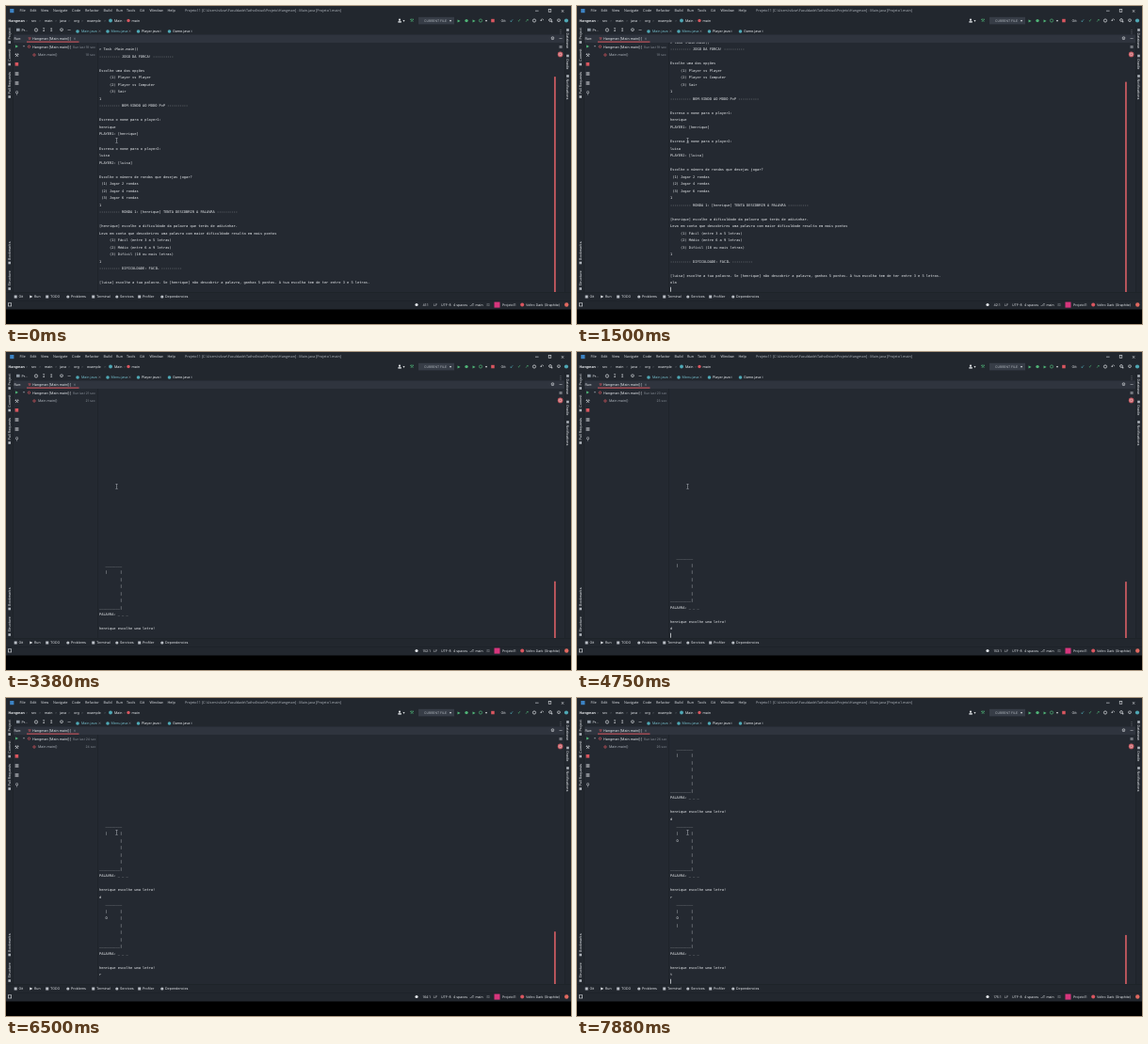
Animation of 600x338 px, one loop 8 s. Source, as an HTML page with a canvas:

```html
<!DOCTYPE html>
<html lang="pt">
<head>
<meta charset="utf-8">
<title>Hangman</title>
<style>
html, body { margin: 0; width: 100%; height: 100%; overflow: hidden; background: #000; }
canvas { display: block; }
</style>
</head>
<body>
<canvas id="stage" width="600" height="338"></canvas>
<script>
const ctx = document.getElementById('stage').getContext('2d');
const LOOP = 8000, LINE = 7.515, CARET_Y = 301.5, CHAR = 2.195;
const UI = 'Inter, sans-serif', MENU = '"Open Sans", sans-serif';
const MONO = '"DejaVu Sans Mono", monospace', SYMBOL = '"DejaVu Sans", sans-serif';
const WHITE = '#e3e6ea', GREY = '#858c95', GREEN = '#4fb477', RED = '#d9565f', TEAL = '#4fa8b5', PINK = '#d6357c';

// Console content
const A = 'henrique', B = 'luisa';
const banner = s => `---------- ${s} ----------`;
const intro = '\n'.repeat(6) + [
  '> Task :Main.main()', banner('JOGO DA FORCA!'), '',
  'Escolhe uma das opções',
  '     (1) Player vs Player', '     (2) Player vs Computer', '     (3) Sair', '1',
  banner('BEM-VINDO AO MODO PvP'), '',
  'Escreva o nome para o player1:', A, `PLAYER1: [${A}]`, '',
  'Escreva o nome para o player2:', B, `PLAYER2: [${B}]`, '',
  'Escolhe o número de rondas que desejas jogar?',
  ' (1) Jogar 2 rondas', ' (2) Jogar 4 rondas', ' (3) Jogar 6 rondas', '1',
  banner(`RONDA 1: [${A}] TENTA DESCOBRIR A PALAVRA`), '',
  `[${A}] escolhe a dificuldade da palavra que terás de adivinhar.`,
  'Leva em conta que descobrires uma palavra com maior dificuldade resulta em mais pontos',
  '     (1) Fácil (entre 3 a 5 letras)', '     (2) Médio (entre 6 a 9 letras)',
  '     (3) Difícil (10 ou mais letras)', '1',
  banner('DIFICULDADE: FACIL'), '',
  `[${B}] escolhe a tua palavra. Se [${A}] não descobrir a palavra, ganhas 5 pontos. A tua escolha tem de ter entre 3 e 5 letras.`,
  ''
].join('\n');

function gallows(misses) {
  const row = c => `   ${c}      |`;
  return ['   ________', row('|'), row(misses > 0 ? 'O' : ' '), row(misses > 1 ? '|' : ' '),
    row(' '), row(' '), '__________|', 'PALAVRA: _ _ _ ', '', `${A} escolhe uma letra!`, ''].join('\n');
}

// Each entry appends text to the console at its time; replies come a second after Enter
const output = [
  [-600, intro], [700, 'o'], [900, 'l'], [1100, 'a'], [1400, '\n'],
  [2400, '\n'.repeat(100) + gallows(0)],
  [4000, 'd'], [4300, '\n'], [5300, gallows(1)],
  [5630, 'r'], [5900, '\n'], [6900, gallows(2)],
  [7500, 't'], [7750, '\n']
];

// Drawing helpers; y is the middle of the capitals
function text(s, x, y, color = WHITE, font = UI, size = 3.7, weight = 400) {
  ctx.font = `${weight} ${size}px ${font}`;
  ctx.fillStyle = color;
  ctx.fillText(s, x, y + size * .36);
}
function row(y, items, color, font, size) {
  for (const [s, x] of Object.entries(items)) text(s, x, y, color, font, size);
}
function box(x, y, w, h, color) {
  ctx.fillStyle = color;
  ctx.fillRect(x, y, w, h);
}
function dot(x, y, color, r = 1.9) {
  ctx.fillStyle = color;
  ctx.beginPath();
  ctx.arc(x, y, r, 0, 7);
  ctx.fill();
}
function ring(x, y, color, r = 1.6) {
  ctx.strokeStyle = color;
  ctx.lineWidth = .7;
  ctx.beginPath();
  ctx.arc(x, y, r, 0, 7);
  ctx.stroke();
}
function icon(s, x, y, color = WHITE, size = 5) {
  ctx.textAlign = 'center';
  text(s, x, y, color, SYMBOL, size);
  ctx.textAlign = 'left';
}
function side(s, x, y, turn) {
  ctx.save();
  ctx.translate(x, y);
  ctx.rotate(turn * Math.PI / 2);
  text(s, 0, 0);
  box(-4.3, -1.3, 2.6, 2.6, '#aeb4bb');
  ctx.restore();
}

function drawTop() {
  box(4.2, 3, 4.2, 4.2, '#3c83c4');
  row(5, { File: 14.5, Edit: 25.5, View: 37, Navigate: 50, Code: 70, Refactor: 84, Build: 103.5, Run: 117,
    Tools: 128, Git: 142, Window: 152.5, Help: 171.5 }, WHITE, MENU, 3.8);
  text('Projeto11 [C:\\Users\\silvar\\Faculdade\\TathoEstud\\Projeto\\Hangman] - Main.java [Projeto1.main]',
    190, 5, '#b4bac1', MENU, 3.75);
  box(562, 4.8, 3.6, .6, WHITE);
  ctx.strokeStyle = WHITE;
  ctx.lineWidth = .6;
  ctx.strokeRect(576.2, 3.6, 2.6, 2.6);
  icon('×', 591, 5);

  text('Hangman', 2.5, 15.5, WHITE, UI, 3.7, 700);
  row(15.5, { src: 27, main: 41, java: 57, org: 72, example: 86, Main: 115 });
  text('main', 133.5, 15.5);
  for (const x of [22, 36, 53, 67, 81, 105, 126]) icon('›', x, 15.3, GREY, 4);
  dot(111, 15.5, TEAL);
  dot(130, 15.5, RED, 1.7);

  dot(418, 14.7, WHITE, 1.1);
  box(416.4, 16.2, 3.4, 1.4, WHITE);
  icon('▾', 422.5, 15.5, WHITE, 4);
  icon('⚒', 431, 15.5, GREEN);
  box(438, 11.8, 38, 7.6, '#373d47');
  text('CURRENT FILE', 444, 15.6, '#b5bbc2', UI, 3.4);
  icon('▾', 472, 15.5, WHITE, 4);
  icon('▶', 481, 15.5, GREEN, 4);
  dot(489, 15.6, GREEN, 1.7);
  icon('▶', 497, 15.5, GREEN, 4);
  ring(504, 15.5, GREEN);
  icon('▾', 510, 15.5, WHITE, 4);
  box(515.2, 13.8, 3.5, 3.5, RED);
  text('Git:', 525.5, 15.5);
  icon('↙', 537, 15.5, TEAL);
  icon('✓', 545, 15.5, GREEN);
  icon('↗', 553, 15.5, GREEN);
  ring(561, 15.5, WHITE);
  icon('↶', 569, 15.5);
  ring(578, 15, WHITE, 1.4);
  box(579, 16.2, 1.3, 1.1, WHITE);
  icon('⚙', 587, 15.5);
  dot(595, 15.5, TEAL, 2.1);

  box(11, 23.8, 3.6, 3, '#8e98a3');
  text('Pr...', 16.5, 25.5);
  ring(32, 25.5, WHITE);
  icon('↧', 40, 25.5);
  icon('↥', 48, 25.5);
  icon('⚙', 59, 25.5);
  icon('−', 67, 25.5);
  row(27, { 'Main.java': 80, 'Menu.java': 111.5 }, '#72b9c6');
  row(27, { 'Player.java': 144, 'Game.java': 177 });
  for (const x of [76, 108, 140.5, 173.5]) {
    dot(x, 27, TEAL, 1.8);
    icon('×', x + 23.5, 27, GREY, 4);
  }
  icon('⋮', 589, 27);
}

function drawRunPanel(t) {
  text('Run:', 8.5, 34.5);
  icon('⚒', 25, 34.5, RED, 4);
  text('Hangman [Main.main()]', 28, 34.5);
  icon('×', 73, 34.5, GREY, 4);
  box(22, 37.6, 55.5, 1, RED);
  icon('⚙', 580.5, 34.5);
  icon('−', 589, 34.5);

  const sec = Math.floor(18.4 + t / 1000) + ' sec';
  icon('▾', 19, 43, GREY, 4);
  ring(24.5, 43.2, RED, 1.2);
  text('Hangman [Main.main()]', 28, 43.3);
  ctx.save();
  ctx.beginPath();
  ctx.rect(0, 40, 95.5, 20);
  ctx.clip();
  text('Run last ' + sec, 71, 43.3, GREY, UI, 3.4);
  ctx.restore();
  ring(30, 52, RED, 1.2);
  text('Main.main()', 34, 52, '#aab0b8');
  text(sec, 84.5, 52, GREY, UI, 3.4);

  icon('▶', 11.5, 43, GREEN, 4);
  icon('⚒', 11.5, 52);
  box(9.6, 60, 3.6, 3.6, RED);
  for (const y of [72, 82]) {
    box(9.6, y - 1.5, 3.8, 1, WHITE);
    box(9.6, y + .5, 3.8, 1, WHITE);
  }
  icon('⚲', 11.5, 92);
  icon('≡', 589, 43);
  dot(588.6, 51.4, '#c65b63', 2.8);
  ring(588.6, 51.4, '#e5c7ca', 1.3);
}

function drawSides() {
  side('Project', 3.7, 35.5, -1);
  side('Commit', 3.7, 59, -1);
  side('Pull Requests', 3.7, 93.5, -1);
  side('Bookmarks', 3.7, 270, -1);
  side('Structure', 3.7, 297.5, -1);
  side('Database', 596.5, 28.5, 1);
  side('Gradle', 596.5, 56, 1);
  side('Notifications', 596.5, 77.5, 1);
}

function drawBottom(position) {
  const tools = { Git: 13.5, Run: 30, TODO: 47, Problems: 69, Terminal: 96, Services: 121,
    Profiler: 145, Dependencies: 169 };
  row(309, tools, WHITE, UI, 3.6);
  Object.values(tools).forEach((x, i) => {
    if (i === 1) icon('▶', x - 3.3, 309, WHITE, 4);
    else if (i % 2) dot(x - 3.2, 309, '#b9bec5', 1.6);
    else box(x - 4.8, 307.5, 3, 3, '#b9bec5');
  });
  ctx.strokeStyle = WHITE;
  ctx.lineWidth = .6;
  ctx.strokeRect(2.5, 315.8, 3.2, 3.2);
  dot(436, 317.5, WHITE, 1.6);
  row(317.5, { [position]: 442.5, LF: 454, 'UTF-8': 462, '4 spaces': 475, main: 498.5, Projeto11: 527 }, WHITE, UI, 3.5);
  icon('⎇', 494.5, 317.5, WHITE, 4);
  icon('⚿', 512, 317.5, WHITE, 4);
  box(518.5, 314.6, 6, 6, PINK);
  dot(548.2, 317.5, RED, 2);
  text('Veltro Dark (Graphite)', 552, 317.5, WHITE, UI, 3.5);
  dot(595.3, 317.5, '#e0685f', 2.2);
}

function drawConsole(lines, caretOn) {
  ctx.save();
  ctx.beginPath();
  ctx.rect(97, 38.8, 486, 265.5);
  ctx.clip();
  const last = lines.length - 1;
  for (let i = Math.max(0, last - 36); i <= last; i++)
    text(lines[i], 99, CARET_Y - (last - i) * LINE, '#eceff2', MONO, 3.65);
  if (caretOn) box(99.2 + lines[last].length * CHAR, CARET_Y - 2.8, .75, 5, WHITE);
  ctx.restore();
  const top = 306 - 9465 / lines.length;
  box(582, top, 1.9, 304 - top, '#bd565d');
}

function drawPointer() {
  const color = '#a4a9b0';
  box(117.2, 140.2, .6, 5, color);
  box(116.3, 140, 2.4, .5, color);
  box(116.3, 145, 2.4, .5, color);
}

function draw(t) {
  const done = output.filter(([at]) => at <= t);
  const lines = done.map(([, s]) => s).join('').split('\n');
  const idle = t - done[done.length - 1][0];
  const column = lines[lines.length - 1].length + 1;

  box(0, 0, 600, 338, '#000');
  box(0, 0, 600, 322.5, '#22272e');
  box(8, 39, 585, 265, '#242931');
  box(8, 30.5, 585, 8.5, '#2f343e');
  box(7.3, 21, .5, 283, '#1b2025');
  box(97, 39, .5, 265, '#1b2025');
  box(593, 21, .5, 283, '#1b2025');
  box(0, 304.3, 600, .5, '#1b2025');
  box(0, 313.2, 600, .4, '#1b2025');

  drawTop();
  drawRunPanel(t);
  drawSides();
  drawConsole(lines, idle % 1000 < 500);
  drawBottom(`${lines.length}:${column}`);
  drawPointer();
}

ctx.textRendering = 'geometricPrecision';
const start = performance.now();
function tick() {
  draw((performance.now() - start) % LOOP);
  requestAnimationFrame(tick);
}
tick();
</script>
</body>
</html>
```
